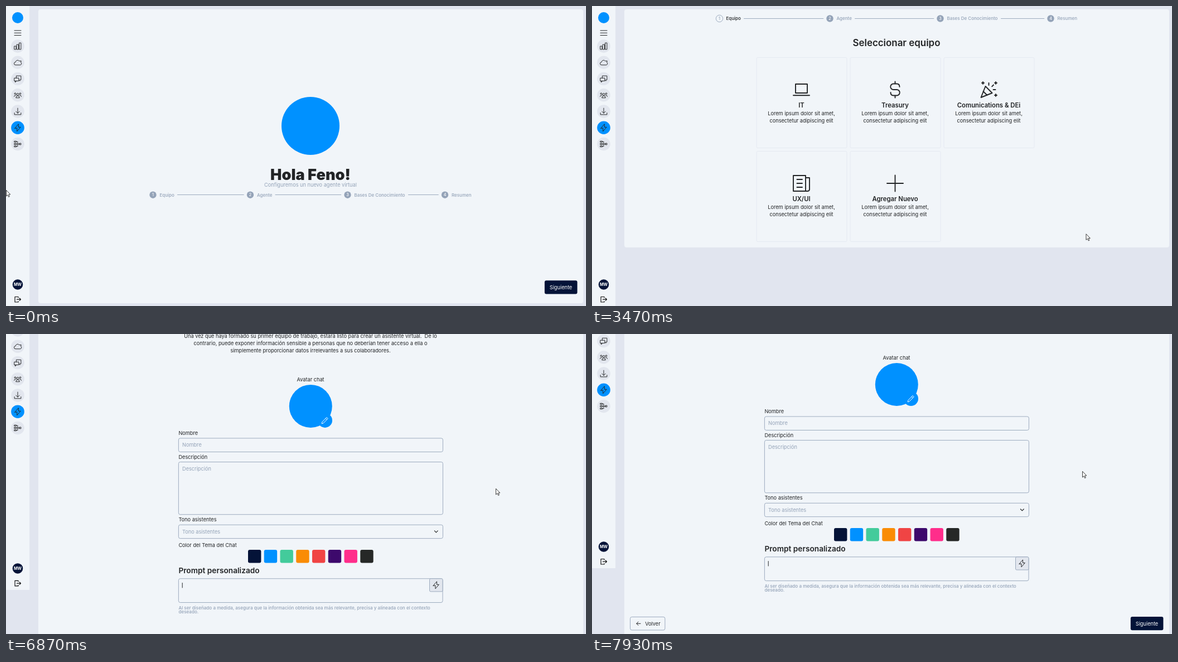
An HTML page that plays this animation: 1040x538 px, repeating every 8000 ms.

```html
<!DOCTYPE html>
<html lang="es">
<head>
<meta charset="utf-8">
<title>Asistente de configuración</title>
<style>
  html, body { margin: 0; width: 100%; height: 100%; overflow: hidden; background: #e1e5ef; }
  svg { display: block; width: 100%; height: 100%; }
  text { font-family: Inter, "Open Sans", sans-serif; font-optical-sizing: none; white-space: pre; }
</style>
</head>
<body>
<svg id="stage" viewBox="0 0 1040 538"></svg>
<script>
const LOOP = 8000, FPS = 15;
const PANEL = '#f1f5f9', SOFT = '#e2e6ee', GRAY = '#94a3b8', DARK = '#222426',
      NAVY = '#041338', BLUE = '#0091ff', GREEN = '#43cb9b';
const MIDDLE = 546, SCROLLED = 118;

// ---------- drawing helpers ----------
const text = (s, x, y, { size = 9.2, fill = DARK, weight = 400, anchor = 'start' } = {}) =>
  `<text x="${x}" y="${y}" font-size="${size}" fill="${fill}" font-weight="${weight}" text-anchor="${anchor}">${s}</text>`;
const mid = (s, x, y, o = {}) => text(s, x, y, { ...o, anchor: 'middle' });
const rect = (x, y, w, h, fill, r = 0, stroke = 'none') =>
  `<rect x="${x}" y="${y}" width="${w}" height="${h}" rx="${r}" fill="${fill}" stroke="${stroke}" stroke-width=".9"/>`;
const disc = (x, y, r, fill, stroke = 'none') =>
  `<circle cx="${x}" cy="${y}" r="${r}" fill="${fill}" stroke="${stroke}" stroke-width=".9"/>`;
const line = (d, stroke = DARK, width = 1) =>
  `<path d="${d}" fill="none" stroke="${stroke}" stroke-width="${width}" stroke-linecap="round" stroke-linejoin="round"/>`;
const repeat = (n, make) => Array.from({ length: n }, (_, i) => make(i)).join('');

// path pieces for icons
const box = (x, y, w, h) => `M${x} ${y}h${w}v${h}h${-w}z`;
const ring = (x, y, r) => `M${x - r} ${y}a${r} ${r} 0 1 0 ${2 * r} 0a${r} ${r} 0 1 0 ${-2 * r} 0`;
const plus = (x, y, r) => `M${x - r} ${y}h${2 * r}M${x} ${y - r}v${2 * r}`;
// icon with its centre at the origin of a 24 unit grid
const icon = (d, x, y, stroke = DARK) =>
  `<g transform="translate(${x} ${y}) scale(.65)">${line(d, stroke, 1.5)}</g>`;

const BOLT = 'M-8 1.5L2-10V-1.5H8L-2 10V1.5z';
const SIDE_ICONS = [
  repeat(3, i => box(-9 + 6.75 * i, -4.5 * i, 4.5, 9 + 4.5 * i)),
  'M9 -4H4L1 -6A6 6 0 00-6 -1A4 4 0 00-6 7H6A4 4 0 009 0z',
  box(-9, -2, 12, 8) + 'M-7 6v4l4 -4M-4 -2V-8H9V3H6v3l-3 -3',
  ring(0, -2, 3) + ring(-7, -4, 2) + ring(7, -4, 2) + 'M-5 7A5 5 0 015 7zM-10 4Q-10 0 -5 0M10 4Q10 0 5 0',
  'M-9 4v5H9V4M-5 0l5 5 5-5M0 5V-9',
  BOLT,
  repeat(3, i => box(-9, -8 + 6.5 * i, 5, 3)) + box(5, -2, 4, 4) + 'M-4 -6.5H0V6.5H-4M-4 0H5'
];

function sidebar() {
  return rect(0, 0, 42, 538, PANEL) + disc(21, 21, 10, BLUE) +
    line(repeat(3, i => `M15 ${44 + 4.3 * i}h12`)) +
    SIDE_ICONS.map((d, i) => {
      const y = 72 + i * 29.25;
      return disc(21, y, 11.8, d === BOLT ? BLUE : SOFT) + icon(d, 21, y);
    }).join('') +
    disc(21, 499.5, 9.3, NAVY) +
    mid('MW', 21, 502.1, { size: 7.2, fill: '#fff', weight: 700 }) +
    line('M22 523V521.5H16v9.5H22V529.5M19.5 526.2h7M24.3 524l2.2 2.2-2.2 2.2', '#111', 1.2);
}

const panel = bottom => rect(58, 6, 977, bottom - 6, PANEL, 4);
const nextButton = y =>
  rect(965.8, y, 58.6, 24.3, NAVY, 3) + mid('Siguiente', 995, y + 15.6, { fill: '#fff' });

const STEPS = [['Equipo', 26], ['Agente', 27], ['Bases De Conocimiento', 91], ['Resumen', 36]];

// active: index of the current step, -1 when none has started
function stepper(x0, gap, y, active) {
  return STEPS.map(([name, width], i) => {
    const x = x0 + i * gap, done = i < active, now = i === active;
    return disc(x, y, 6.2, now ? PANEL : done ? GREEN : GRAY, now ? GRAY : 'none') +
      mid(i + 1, x, y + 2.6, { size: 7.2, fill: now ? GRAY : '#fff', weight: 500 }) +
      text(name, x + 12, y + 2.8, { size: 8, weight: 500, fill: done ? GREEN : now ? DARK : GRAY }) +
      (i < 3 ? line(`M${x + 18 + width} ${Math.floor(y) + .5}H${x + gap - 11.7}`, GRAY, .9) : '');
  }).join('');
}

function welcome() {
  return panel(533) + disc(MIDDLE, 215, 52, BLUE) +
    mid('Hola Feno!', MIDDLE, 312, { size: 27.2, weight: 900 }) +
    mid('Configuremos un nuevo agente virtual', MIDDLE, 324, { fill: GRAY }) +
    stepper(263.5, 174.5, 338.7, -1) + nextButton(492.3);
}

const TEAMS = {
  'IT': box(-10.5, -10, 21, 16) + 'M-14.5 10.3h29',
  'Treasury': 'M0 -14.5v4M0 10.5v4M8 -5Q8 -10.5 3 -10.5H-3A5 5 0 00-3 0H3A5 5 0 013 10.5H-3Q-8 10.5 -8 5',
  'Comunications &amp; DEi': 'M-14 14L-6 -6 6 6zM-10 3L-3 10' +
    plus(-10.5, -12, 2) + plus(12.5, -12, 2) + plus(12.5, 10, 2) +
    repeat(3, i => {
      const c = Math.sin(i * Math.PI / 4), s = -Math.cos(i * Math.PI / 4);
      return `M${8 * c} ${8 * s}L${12 * c} ${12 * s}`;
    }),
  'UX/UI': box(-14.5, -14, 22, 28) + 'M7.5 -10H14.5V11Q14 14 11 14H7.5' +
    repeat(3, i => `M-8 ${7 * i - 7}h9.5`),
  'Agregar Nuevo': plus(0, 0, 14.5)
};

function teams() {
  return panel(433) + stepper(228.5, 198, 22.5, 0) +
    mid('Seleccionar equipo', MIDDLE, 72.3, { size: 16.9, weight: 600 }) +
    Object.entries(TEAMS).map(([name, d], i) => {
      const x = 375.5 + i % 3 * 168, y = 150 + Math.floor(i / 3) * 168;
      return rect(x - 80.5, y - 57.5, 162, 162, 'none', 2, '#e5e9f1') +
        `<g transform="translate(${x} ${y})">${line(d, DARK, 1.9)}</g>` +
        mid(name, x, y + 32.2, { size: 11.3, weight: 600 }) +
        mid('Lorem ipsum dolor sit amet,', x, y + 45.6) +
        mid('consectetur adipiscing elit', x, y + 58.6);
    }).join('');
}

const INTRO = [
  'Una vez que haya formado su primer equipo de trabajo, estará listo para crear un asistente virtual.  De lo',
  'contrario, puede exponer información sensible a personas que no deberían tener acceso a ella o',
  'simplemente proporcionar datos irrelevantes a sus colaboradores.'
];
const HELP = [
  'Al ser diseñado a medida, asegura que la información obtenida sea más relevante, precisa y alineada con el contexto',
  'deseado.'
];
const SWATCHES = [NAVY, BLUE, GREEN, '#fa8c05', '#f04444', '#3d096c', '#ff2d8b', '#262827'];

function assistant() {
  const left = 309.4;
  const label = (s, y) => text(s, left, y);
  const field = (name, y, h) =>
    label(name, y - 6) + rect(left, y, 474, h, PANEL, 3, GRAY) +
    text(name, 316, y + 15.4, { fill: GRAY });
  return panel(666) + stepper(228.5, 198, 22.5, 1) +
    mid('Crear asistente para EQUIPO', MIDDLE, 72.8, { size: 16.7, weight: 600 }) +
    INTRO.map((s, i) => mid(s, MIDDLE, 86.4 + 13 * i)).join('') +
    mid('Avatar chat', MIDDLE, 163.8) +
    disc(MIDDLE + .3, 208.5, 38.5, BLUE) + disc(572, 234, 13, BLUE) +
    icon('M5 -8L8 -5 -5 8 -9 9 -8 5zM2 -5L5 -2', 572, 234, '#fff') +
    field('Nombre', 266, 24.5) +
    field('Descripción', 308.6, 94.2) +
    field('Tono asistentes', 421.3, 24.4) +
    line('M768.4 432l2.9 2.9 2.9-2.9', DARK, 1.2) +
    label('Color del Tema del Chat', 460.8) +
    SWATCHES.map((c, i) => rect(434 + i * 28.75, 466, 23.4, 23.6, c, 3)).join('') +
    text('Prompt personalizado', left, 508, { size: 13.7, weight: 600 }) +
    rect(left, 517.8, 473.6, 42.8, PANEL, 3, GRAY) +
    rect(759.5, 517.8, 23.5, 23.2, SOFT, 2, GRAY) + icon(BOLT, 771.2, 529.4) +
    line('M316.2 525.5v8.5') +
    HELP.map((s, i) => text(s, left, 572.8 + 7.6 * i, { size: 8.1, weight: 500, fill: GRAY })).join('') +
    rect(68.5, 625.4, 62.4, 23.6, 'none', 3, GRAY) +
    line('M87 637.3h-7M83 634.1l-3.2 3.2 3.2 3.2') +
    text('Volver', 95.2, 640.8) + nextButton(625);
}

// ---------- scene ----------
const stage = document.getElementById('stage');
const views = [welcome, teams, assistant];
stage.innerHTML =
  `<g id="page">${sidebar()}${views.map(v => `<g class="view">${v()}</g>`).join('')}</g>
   <path id="pointer" d="M.5 .3V11L3 8.7 4.7 12.5 6.3 11.7 4.7 8H7.8z" fill="#fff" stroke="#1c1c1c" stroke-width=".85" stroke-linejoin="round"/>`;
const page = document.getElementById('page');
const pointer = document.getElementById('pointer');
const layers = document.querySelectorAll('.view');

// pointer stops: arrival tick, x, y
const STOPS = [
  [3, 0, 330], [5, 111, 476], [8, 242, 390], [11, 552, 310], [14, 583, 318],
  [20, 430, 250], [34, 923.5, 376], [41, 995, 503], [50, 1013, 487], [53, 758, 330],
  [56, 619, 165], [59, 523, 143], [66, 411, 166], [81, 817, 261], [84, 888, 356],
  [86, 884, 364], [103, 878, 277], [112, 878, 255], [119, 879, 246]
];

// rest one tick at each stop, then go straight to the next
function pointerAt(k) {
  const i = STOPS.findIndex(s => s[0] >= k);
  const [end, x, y] = STOPS[i];
  const [from, px, py] = STOPS[Math.max(0, i - 1)];
  const u = k >= end || i === 0 ? 1 : Math.max(0, (k - from - 1) / (end - from - 1));
  return [px + (x - px) * u, py + (y - py) * u];
}

// the scroll slows down steadily to its end
function scrollAt(k) {
  const u = Math.max(0, (k - 87) / 32);
  return SCROLLED * (1 - (1 - u) ** 1.6);
}

function draw(ms) {
  const k = Math.min(119, Math.floor((ms + 3.4) * FPS / 1000));
  const current = k < 42 ? 0 : k < 69 ? 1 : 2;
  layers.forEach((layer, i) => layer.setAttribute('display', i === current ? 'inline' : 'none'));
  page.setAttribute('transform', `translate(0 ${-scrollAt(k)})`);
  pointer.setAttribute('transform', `translate(${pointerAt(k)})`);
}

const start = performance.now();
function tick() {
  draw((performance.now() - start) % LOOP);
  requestAnimationFrame(tick);
}
tick();
</script>
</body>
</html>
```
